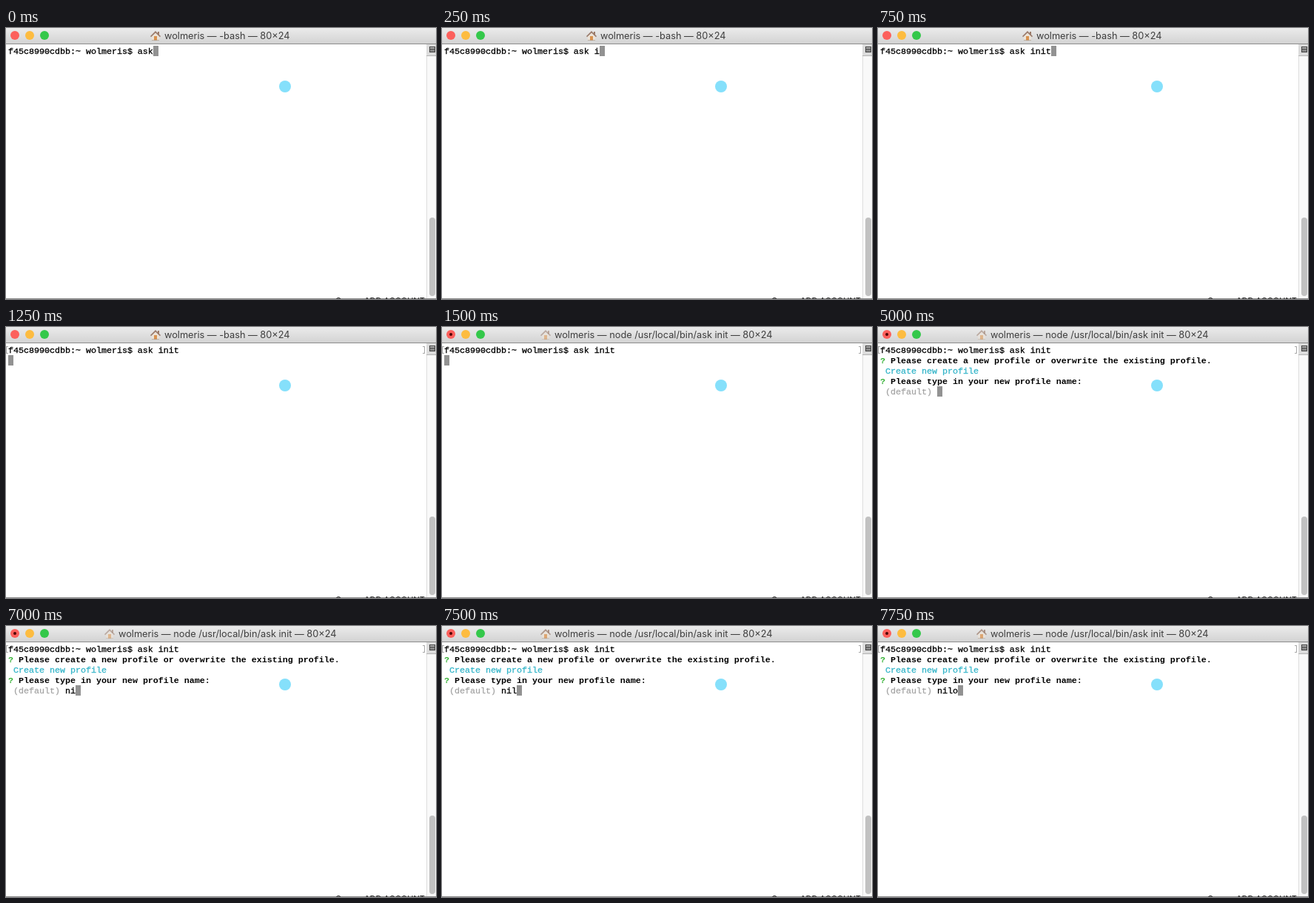
Write an HTML page with a canvas that moves like this. It is 581x366 px and loops after 8 s.

```html
<!DOCTYPE html>
<html lang="en">
<head>
<meta charset="utf-8">
<title>Terminal session</title>
<style>
  html, body { margin: 0; width: 100%; height: 100%; overflow: hidden; background: #fff; }
  canvas { display: block; }
</style>
</head>
<body>
<canvas id="stage" width="581" height="366"></canvas>
<script>
const ctx = document.getElementById('stage').getContext('2d');
const LOOP = 8000, COL = 7, ROW = 14, LEFT = 3, TOP = 24;
const MONO = '11.6667px "Liberation Mono", monospace';
const SANS = 'Inter, sans-serif';
const BLACK = '#000', GRAY = '#a6a6a6', GREEN = '#35b135', CYAN = '#35b5c9';
const USER = 'wolmeris';

// Typed text: [time, visible text]
const COMMAND = [[0, 'ask'], [250, 'ask i'], [500, 'ask ini'], [750, 'ask init']];
const ANSWER = [[5000, ''], [7000, 'ni'], [7250, 'nil'], [7750, 'nilo']];
const typed = (steps, t) => steps.filter(([at]) => at <= t).pop()[1];

function rect(x, y, w, h, color) {
  ctx.fillStyle = color;
  ctx.fillRect(x, y, w, h);
}

function disc(x, y, r, color) {
  ctx.fillStyle = color;
  ctx.beginPath();
  ctx.arc(x, y, r, 0, Math.PI * 2);
  ctx.fill();
}

function poly(color, ...points) {
  ctx.fillStyle = color;
  ctx.beginPath();
  points.forEach(([x, y]) => ctx.lineTo(x, y));
  ctx.fill();
}

function label(text, x, y, font, color) {
  ctx.font = font;
  ctx.fillStyle = color;
  ctx.fillText(text, x, y);
}

function print(col, row, text, color = BLACK, weight = 400) {
  const x = LEFT + col * COL, y = TOP + row * ROW + 11;
  label(text, x, y, `${weight} ${MONO}`, color);
  if (weight > 400) return;
  // A hairline outline gives the regular weight its sturdier stems.
  ctx.strokeStyle = color;
  ctx.lineWidth = 0.3;
  ctx.strokeText(text, x, y);
}

function cursor(col, row) {
  rect(LEFT + col * COL, TOP + row * ROW, COL, ROW, '#929292');
}

function question(row, text) {
  print(0, row, '?', GREEN, 700);
  print(2, row, text, BLACK, 700);
}

function house(x, alpha) {
  ctx.save();
  ctx.translate(x, 4);
  ctx.globalAlpha = alpha;
  rect(10, 1, 2, 4, '#9b7a68');
  poly('#ece3d8', [2, 7], [7, 2], [12, 7], [12, 13], [2, 13]);
  poly('#98796a', [7, 0], [14, 7], [13, 8.2], [7, 2.4], [1, 8.2], [0, 7]);
  rect(5, 7, 4, 6, '#d9924f');
  rect(2, 12.3, 10, 0.7, '#a99a8c');
  ctx.restore();
}

function titleBar(t) {
  const shade = ctx.createLinearGradient(0, 0, 0, 21);
  shade.addColorStop(0, '#ebebeb');
  shade.addColorStop(1, '#d3d3d3');
  rect(0, 0, 581, 21, shade);
  rect(0, 21, 581, 1, '#8c8c8c');
  ['#fc605c', '#fdbc40', '#34c84a'].forEach((color, i) => disc(12 + i * 20, 10, 6, color));

  const running = t >= 1500;
  if (running) disc(12, 10, 2, '#4d0000');
  house(running ? 133 : 195, !running ? 1 : t < 7500 ? 0.55 : 0.75);
  const task = running ? 'node /usr/local/bin/ask init' : '-bash';
  label(`${USER} — ${task} — 80×24`, running ? 152 : 214, 15, `12.75px ${SANS}`, '#3e3e3e');
}

function scrollBar() {
  rect(568, 22, 13, 343, '#f9f9f9');
  rect(568, 22, 1, 343, '#dedede');
  rect(569, 22, 12, 15, '#dcdcdc');
  rect(568, 37, 13, 1, '#b4b4b4');
  rect(572, 25, 8, 8, '#444');
  rect(573, 26, 6, 2, '#aaa');
  rect(573, 29, 6, 3, '#888');
  ctx.fillStyle = '#c1c1c1';
  ctx.beginPath();
  ctx.roundRect(572, 256, 8, 106, 4);
  ctx.fill();
}

// Window edge, with the tops of a caption showing from behind it.
function bottomEdge() {
  rect(0, 365, 581, 1, '#8c8c8c');
  ctx.save();
  ctx.beginPath();
  ctx.rect(440, 364, 128, 2);
  ctx.clip();
  label('C', 445, 372, `11px ${SANS}`, '#222');
  label('ADD ACCOUNT', 484, 372, `11px ${SANS}`, '#222');
  ctx.restore();
}

function brackets() {
  for (const [stem, tick] of [[0, 0], [565, 563]]) {
    rect(stem, 26, 1, 10, '#a8a8a8');
    rect(tick, 26, 3, 1, '#a8a8a8');
    rect(tick, 35, 3, 1, '#a8a8a8');
  }
}

function rule(row) {
  rect(LEFT + 2 * COL, TOP + row * ROW + 8, 14 * COL, 1, GRAY);
}

function pointer(row) {
  const y = TOP + row * ROW + 7;
  ctx.strokeStyle = CYAN;
  ctx.lineWidth = 2;
  ctx.beginPath();
  ctx.moveTo(4, y - 4);
  ctx.lineTo(7.5, y);
  ctx.lineTo(4, y + 4);
  ctx.stroke();
}

function menu() {
  print(1, 2, '(Use arrow keys)', GRAY);
  rule(3);
  pointer(4);
  print(2, 4, 'Create new profile', CYAN);
  rule(5);
  print(2, 6, 'Profile', GRAY);
  print(23, 6, 'Associated AWS Profile', GRAY);
  print(2, 7, '[default]');
  print(28, 7, '"default"');
}

function namePrompt(t) {
  const answer = typed(ANSWER, t);
  print(1, 2, 'Create new profile', CYAN);
  question(3, 'Please type in your new profile name:');
  print(1, 4, '(default)', GRAY);
  print(11, 4, answer);
  cursor(11 + answer.length, 4);
}

function terminal(t) {
  const line = `f45c8990cdbb:~ ${USER}$ ${typed(COMMAND, t)}`;
  print(0, 0, line);
  if (t < 1250) return cursor(line.length, 0);
  brackets();
  if (t < 2750) return cursor(0, 1);
  question(1, 'Please create a new profile or overwrite the existing profile.');
  if (t < 5000) menu();
  else namePrompt(t);
}

function draw(t) {
  rect(0, 0, 581, 366, '#fff');
  titleBar(t);
  scrollBar();
  bottomEdge();
  terminal(t);
  disc(377, 79, 8, '#85e0fb');
}

const start = performance.now();
function tick() {
  draw((performance.now() - start) % LOOP);
  requestAnimationFrame(tick);
}
tick();
</script>
</body>
</html>
```
